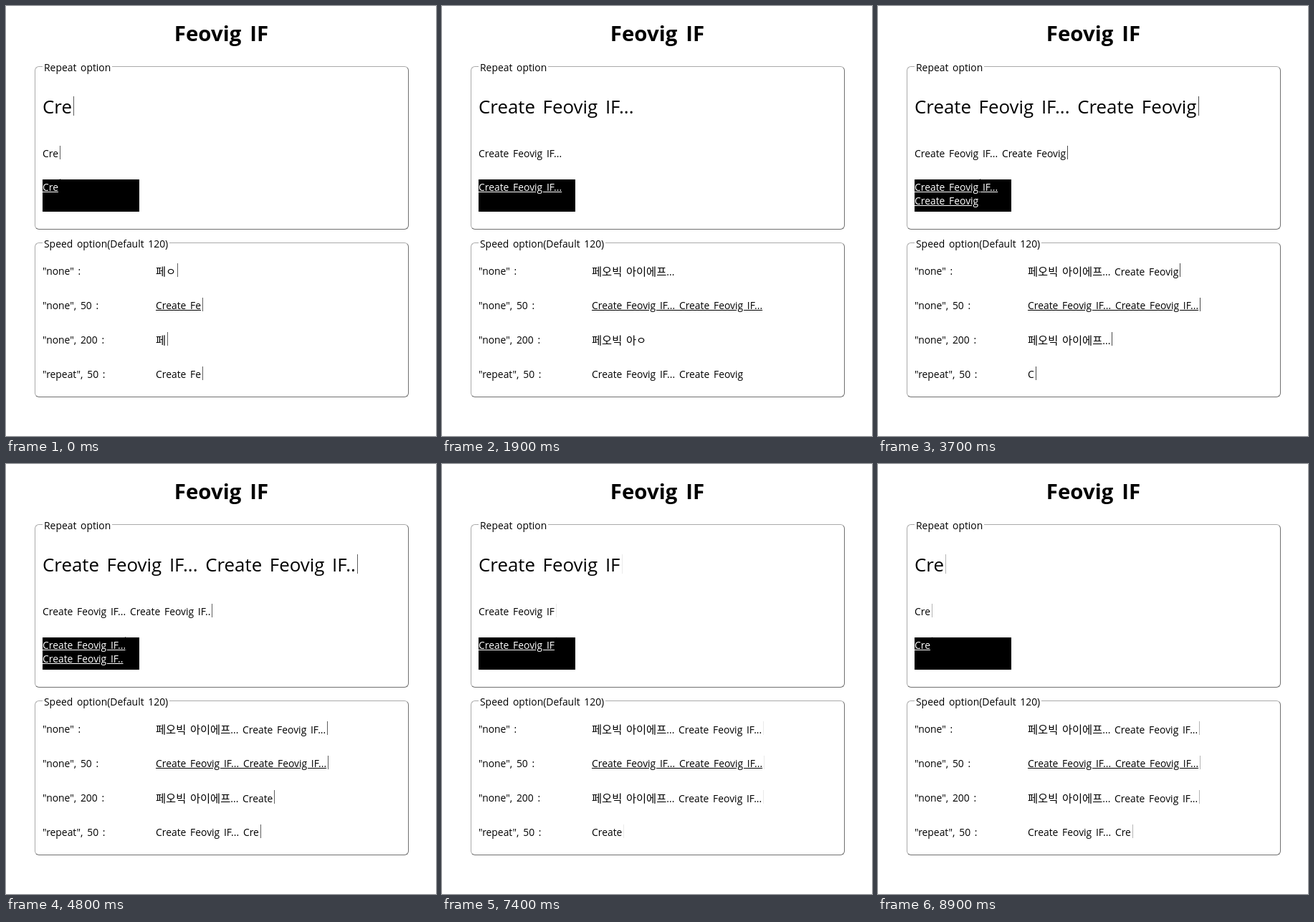
Recreate the animation shown at these times as an HTML page. Size 600 by 600 pixels, loop 9 s.

```html
<!DOCTYPE html>
<html lang="ko">
<head>
<meta charset="utf-8">
<title>Typing effect</title>
<style>
html, body { margin: 0; width: 100%; height: 100%; overflow: hidden; background: #fff; }
body { position: relative; color: #000; font: 13.9px/20px "Open Sans", "Noto Sans CJK KR", "Noto Sans CJK", sans-serif; }
body > * { position: absolute; margin: 0; box-sizing: border-box; white-space: nowrap; word-spacing: .15em; }
h1 { left: 0; top: 18px; width: 601px; font-size: 29.4px; line-height: 40px; text-align: center; }
.panel { left: 40px; width: 522px; border: 1px solid; border-color: #aaa #707070 #707070 #aaa; border-radius: 6px; }
.panel span { position: absolute; left: 10px; top: -9px; padding: 0 2px; background: #fff; }
.line b { font-weight: 300; font-size: 15.3px; }
.line i { position: absolute; top: -1px; width: 1px; height: 19px; margin-left: 2px; background: #000; }
.big { font-size: 25.9px; line-height: 36px; }
.big i { top: 4px; height: 27px; }
.under { text-decoration: underline; }
.box { width: 135px; height: 45px; padding-top: 1px; line-height: 19px; white-space: normal; color: #fff; background: #000; }
</style>
</head>
<body>
<h1>Feovig IF</h1>
<div class="panel" style="top:84px;height:228px"><span>Repeat option</span></div>
<div class="panel" style="top:330px;height:216px"><span>Speed option(Default 120)</span></div>
<script>
const LOOP = 9000, FRAME = 100, LEAD_IN = 455, HOLD = 2.8, GAP = 1;
const LEADS = 'ㄱㄲㄴㄷㄸㄹㅁㅂㅃㅅㅆㅇㅈㅉㅊㅋㅌㅍㅎ';
const latin = 'Create Feovig IF... Create Feovig IF...';
const korean = '페오빅 아이에프... Create Feovig IF...';

// Every text state reached while typing; Hangul is composed key by key.
function keystrokes(text) {
  const states = [''];
  let done = '';
  for (const ch of text) {
    const code = ch.charCodeAt(0) - 0xAC00;
    if (code >= 0 && code < 11172) {
      const tail = code % 28;
      states.push(done + LEADS[Math.floor(code / 588)]);
      if (tail) states.push(done + String.fromCharCode(0xAC00 + code - tail));
    }
    done += ch;
    states.push(done);
  }
  return states;
}

function addLine(x, y, cls, html) {
  const el = document.createElement('div');
  el.className = 'line ' + cls;
  el.style.left = x + 'px';
  el.style.top = y + 'px';
  el.innerHTML = html;
  document.body.append(el);
  return el;
}

function typer(x, y, text, speed, repeat, cls = '') {
  const el = addLine(x, y, cls, '<span></span><i></i>');
  return { out: el.firstChild, cursor: el.lastChild, states: keystrokes(text), speed, repeat };
}

['"none" :', '"none", 50 :', '"none", 200 :', '"repeat", 50 :']
  .forEach((label, i) => addLine(51, 360 + 48 * i, '', label));

const typers = [
  typer(51, 122, latin, 120, true, 'big'),
  typer(51, 196, latin, 120, true),
  typer(51, 242, latin, 120, true, 'box under'),
  typer(209, 360, korean, 120, false),
  typer(209, 408, latin, 50, false, 'under'),
  typer(209, 456, korean, 200, false),
  typer(209, 504, latin, 50, true)
];

function keyCount(ticks, total, repeat) {
  if (repeat) ticks %= 2 * total + HOLD + GAP;
  if (!repeat || ticks < total + HOLD) return Math.min(total, Math.floor(ticks));
  return Math.max(0, total - Math.floor(ticks - total - HOLD));
}

// Fades out and back in over 800 ms, quick start and soft end.
function blink(t) {
  const phase = ((t + 85) % 800) / 400;
  const p = (phase % 1) ** .57;
  const eased = p * p * (3 - 2 * p);
  return phase < 1 ? 1 - eased : eased;
}

function draw() {
  const t = Math.floor((performance.now() % LOOP) / FRAME) * FRAME;
  const opacity = blink(t);
  for (const { out, cursor, states, speed, repeat } of typers) {
    const n = keyCount((t + LEAD_IN) / speed, states.length - 1, repeat);
    out.innerHTML = states[n].trimEnd().replace(/[ㄱ-힣]+/g, '<b>$&</b>');
    cursor.style.opacity = opacity;
  }
  requestAnimationFrame(draw);
}
draw();
</script>
</body>
</html>
```
